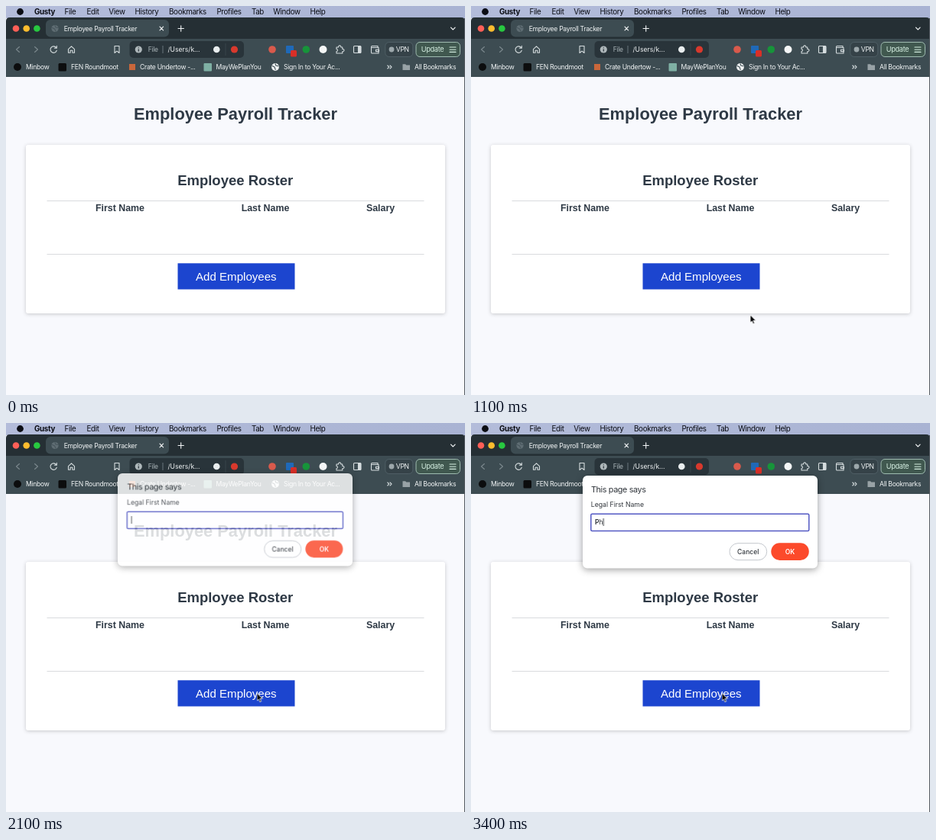
Write an HTML page that moves like this. It is 600 px wide and 510 px high and loops after 3.5 s.

```html
<!DOCTYPE html>
<html lang="en">
<head>
<meta charset="utf-8">
<title>Employee Payroll Tracker</title>
<style>
  html, body { margin: 0; width: 100%; height: 100%; overflow: hidden; background: #f8f9fd; }
  svg { display: block; width: 600px; height: 510px; }
  text { white-space: pre; }
  .ui { font: 8.6px Inter, Roboto, sans-serif; letter-spacing: -.035em; fill: #f1f4f5; }
  .menu { font-size: 9.8px; fill: #0b0d14; text-anchor: middle; }
  .mid { text-anchor: middle; }
  .bold { font-weight: 600; }
  .page { font: bold 12.4px "Liberation Sans", Arial, sans-serif; fill: #2e3945; text-anchor: middle; }
  .line { fill: none; stroke: #d5dcde; stroke-width: 1.1; stroke-linecap: round; stroke-linejoin: round; }
  .dim { stroke: #7b888d; }
  .card { filter: drop-shadow(0 1px 2.5px rgba(0, 0, 0, .2)); }
  .dialog { filter: drop-shadow(0 2px 5px rgba(0, 0, 0, .38)); animation: open 3.5s step-end infinite; }
  .content { transform-origin: 300px 130px; animation: settle 3.5s step-end infinite; }
  .content text { fill: #30353b; letter-spacing: 0; }
  .p { animation: typeP 3.5s step-end infinite; }
  .h { animation: typeH 3.5s step-end infinite; }
  .caret { animation: caret 3.5s step-end infinite; }
  .cursor { animation: move 3.5s infinite; }

  @keyframes open {
    0% { opacity: 0; transform: translateY(-3px); }
    60% { opacity: .83; transform: translateY(-3px); }
    62.85%, 100% { opacity: 1; transform: none; }
  }
  @keyframes settle {
    0% { transform: scale(.99); }
    62.85%, 100% { transform: none; }
  }
  @keyframes typeP { 0% { opacity: 0; } 82.85%, 100% { opacity: 1; } }
  @keyframes typeH { 0% { opacity: 0; } 91.42%, 100% { opacity: 1; } }
  @keyframes caret {
    0% { transform: none; }
    82.85% { transform: translateX(5px); }
    91.42%, 100% { transform: translateX(10.4px); }
  }
  /* The pointer advances once every 100 ms */
  @keyframes move {
    0% { transform: translate(440px, 514px); animation-timing-function: step-end; }
    5.71% { transform: translate(440px, 514px); animation-timing-function: steps(4); }
    17.14% { transform: translate(392px, 437px); animation-timing-function: step-end; }
    20% { transform: translate(392px, 437px); animation-timing-function: steps(8); }
    42.85% { transform: translate(337px, 373px); animation-timing-function: steps(3); }
    51.42%, 100% { transform: translate(327.5px, 354px); }
  }
</style>
</head>
<body>
<svg viewBox="0 0 600 510" xmlns="http://www.w3.org/2000/svg">
  <defs>
    <linearGradient id="bar"><stop stop-color="#b3bcda"/><stop offset="1" stop-color="#a9b3d3"/></linearGradient>
  </defs>

  <!-- Menu bar -->
  <rect width="600" height="16" fill="url(#bar)"/>
  <circle cx="18.5" cy="7.5" r="4.4" fill="#0b0d14"/>
  <g class="ui menu">
    <text x="50.5" y="11" style="font-weight:700">Gusty</text>
    <text x="84" y="11">File</text>
    <text x="113.5" y="11">Edit</text>
    <text x="145" y="11">View</text>
    <text x="184" y="11">History</text>
    <text x="237.5" y="11">Bookmarks</text>
    <text x="291.5" y="11">Profiles</text>
    <text x="329" y="11">Tab</text>
    <text x="367" y="11">Window</text>
    <text x="407.5" y="11">Help</text>
  </g>

  <!-- Tab strip -->
  <path d="M0 93V20q0-5 5-5H595q5 0 5 5V93z" fill="#252f34"/>
  <circle cx="13" cy="29.5" r="4.3" fill="#fe5f57"/>
  <circle cx="26.7" cy="29.5" r="4.3" fill="#febc2e"/>
  <circle cx="40.4" cy="29.5" r="4.3" fill="#28c840"/>
  <rect x="52" y="18" width="161" height="22.5" rx="6" fill="#3d4c52"/>
  <circle cx="64" cy="29.5" r="4.6" fill="#5f6d73"/>
  <path class="line" style="stroke:#46555b" d="M60.5 28.5l3 1.5 1.5 3M64 25.5l1 2.5 3 .5"/>
  <text class="ui mid" x="123.5" y="32.5">Employee Payroll Tracker</text>
  <path class="line" style="stroke:#f1f4f5" d="M201 27.2l4.6 4.6m0-4.6l-4.6 4.6M225 29.5h7.4M228.7 25.8v7.4M581.5 28.2l2.8 2.8 2.8-2.8"/>

  <!-- Toolbar -->
  <rect y="43" width="600" height="50.5" fill="#3d4c52"/>
  <g class="line">
    <path class="dim" d="M17.5 53.5L13.5 57l4 3.5M37.5 53.5l4 3.5-4 3.5"/>
    <path d="M65.6 54.6a4.2 4.2 0 1 0 .7 3.6M66.3 52.4v2.9h-2.9"/>
    <path d="M81.5 56.6l4-3.7 4 3.7V61.2h-2.6v-3h-2.8v3h-2.6z"/>
    <path d="M142 52.5h6v9l-3-2.4-3 2.4z"/>
  </g>
  <rect x="161.5" y="46" width="149.5" height="22" rx="5" fill="#29343a"/>
  <circle cx="173.3" cy="57" r="4.6" fill="#aeb7ba"/>
  <path d="M173.3 56.5v3M173.3 54.2v1" stroke="#29343a" stroke-width="1.2"/>
  <text class="ui mid" x="192.3" y="60" style="fill:#a9b3b7">File</text>
  <path d="M205 52v10" stroke="#738086" stroke-width=".9"/>
  <text class="ui" x="211.5" y="60" style="letter-spacing:0">/Users/k...</text>
  <circle cx="275.3" cy="57" r="4.3" fill="#e9edee"/>
  <path d="M287 49v16" stroke="#3d4a50" stroke-width=".8"/>
  <circle cx="298.5" cy="57" r="4.6" fill="#d8392d"/>

  <circle cx="348" cy="57" r="4.8" fill="#d95a4c"/>
  <rect x="366" y="52" width="10" height="10" rx="1" fill="#1f69b8"/>
  <rect x="372" y="58" width="8" height="8.5" rx="1.5" fill="#da2f27"/>
  <circle cx="392.3" cy="57" r="4.8" fill="#17943a"/>
  <circle cx="414.5" cy="57" r="5" fill="#f4f6f6"/>
  <g class="line">
    <path d="M432 54h2.7a1.6 1.6 0 1 1 3 0h2.1v2.6a1.6 1.6 0 1 1 0 3V62H432v-2.5a1.5 1.5 0 0 0 0-3z"/>
    <rect x="454.5" y="52.5" width="9.5" height="9" rx="1"/>
    <path d="M460.5 53h3v8h-3z" fill="#d5dcde"/>
    <path d="M486 54.5v-2h-7.5q-1 0-1 1v7.5q0 1 1 1h8.5v-7.5h-8.5M483.5 57.2h4v2.4h-4z" class="line"/>
  </g>
  <rect x="495.8" y="47.5" width="36" height="19" rx="5" fill="#354248" stroke="#526168" stroke-width=".9"/>
  <circle cx="504" cy="57" r="3.4" fill="#9ca7ab"/>
  <text class="ui mid" x="518.3" y="60">VPN</text>
  <rect x="536" y="47.5" width="57.5" height="19" rx="5" fill="#40584f" stroke="#9fbcb0"/>
  <text class="ui mid" x="557.5" y="60.2" style="fill:#d5efe2;font-size:9.2px">Update</text>
  <path class="line" style="stroke:#d5efe2" d="M580 54h8M580 57.2h8M580 60.4h8"/>

  <!-- Bookmarks -->
  <circle cx="15" cy="80" r="5" fill="#0c0d0e"/>
  <rect x="68.5" y="75" width="10.5" height="10.5" rx="1.5" fill="#0c0d0e"/>
  <rect x="161" y="76" width="8" height="8" fill="#c9673b"/>
  <rect x="258.5" y="75" width="10.5" height="10.5" rx="1" fill="#7fb0a4"/>
  <circle cx="352" cy="80" r="4.9" fill="#eef1f2"/>
  <path class="line" style="stroke:#3d4c52" d="M348 78.5l3 1.5 1.2 3.4M352 75.7l.8 2.3 3 .8"/>
  <g class="ui">
    <text x="26" y="83">Minbow</text>
    <text x="85" y="83">FEN Roundmoot</text>
    <text x="175" y="83">Crate Undertow -...</text>
    <text x="274.5" y="83">MayWePlanYou</text>
    <text x="363" y="83">Sign In to Your Ac...</text>
    <text x="534" y="83">All Bookmarks</text>
  </g>
  <path class="line" d="M498.8 78l2 2-2 2M502 78l2 2-2 2"/>
  <path d="M518.5 76.3h3.6l1.2 1.3h4.7v6.4h-9.5z" fill="#98a2a6"/>

  <!-- Page -->
  <rect y="93" width="600" height="417" fill="#f8f9fd"/>
  <rect class="card" x="26" y="182" width="548" height="221" rx="3" fill="#fff"/>
  <text class="page" x="300" y="149" style="font-size:21.85px">Employee Payroll Tracker</text>
  <text class="page" x="299.7" y="235" style="font-size:18.5px">Employee Roster</text>
  <path d="M53.5 255.5h493M53.5 325.5h493" stroke="#d9dbde" stroke-width="1.2"/>
  <text class="page" x="149" y="269">First Name</text>
  <text class="page" x="339" y="269">Last Name</text>
  <text class="page" x="489.5" y="269">Salary</text>
  <rect x="224.5" y="337.3" width="153" height="34.2" fill="#1c45cf"/>
  <text class="page" x="300.8" y="359.5" style="font-size:15.1px;font-weight:400;fill:#fff">Add Employees</text>
  <path d="M599.5 16v494" stroke="#555b62"/>

  <!-- Prompt -->
  <g class="dialog">
    <rect x="146" y="69" width="307" height="121.5" rx="6" fill="#fff"/>
    <g class="content ui">
      <text x="157" y="90.5" style="font-size:10.8px;letter-spacing:-.035em">This page says</text>
      <text x="156.8" y="110.3" style="font-size:8.7px">Legal First Name</text>
      <rect x="156.8" y="119.2" width="285" height="22.3" rx="1.5" fill="#fff" stroke="#5359c4" stroke-width="1.5"/>
      <text x="162" y="133.3"><tspan class="p">P</tspan></text>
      <text class="p" x="162" y="133.3">P</text>
      <text class="h" x="167.4" y="133.3">h</text>
      <path class="caret" d="M162.8 125v10" stroke="#22262b" stroke-width=".9"/>
      <rect x="338" y="157.7" width="48.7" height="22" rx="11" fill="#fff" stroke="#c3c7cc"/>
      <text class="mid" x="362.2" y="171.6" style="font-weight:500;font-size:8.5px">Cancel</text>
      <rect x="392.3" y="157.3" width="49.5" height="22.6" rx="11.3" fill="#fc4a2b"/>
      <text class="mid bold" x="417" y="171.6" style="fill:#fff;font-size:8.5px">OK</text>
    </g>
  </g>

  <path class="cursor" d="M.5 0V10.2L2.8 8.1 4.4 11.8 6.2 11 4.6 7.4H7.8z" fill="#08090b" stroke="#fff" stroke-width=".8" stroke-linejoin="round"/>
</svg>
</body>
</html>
```
